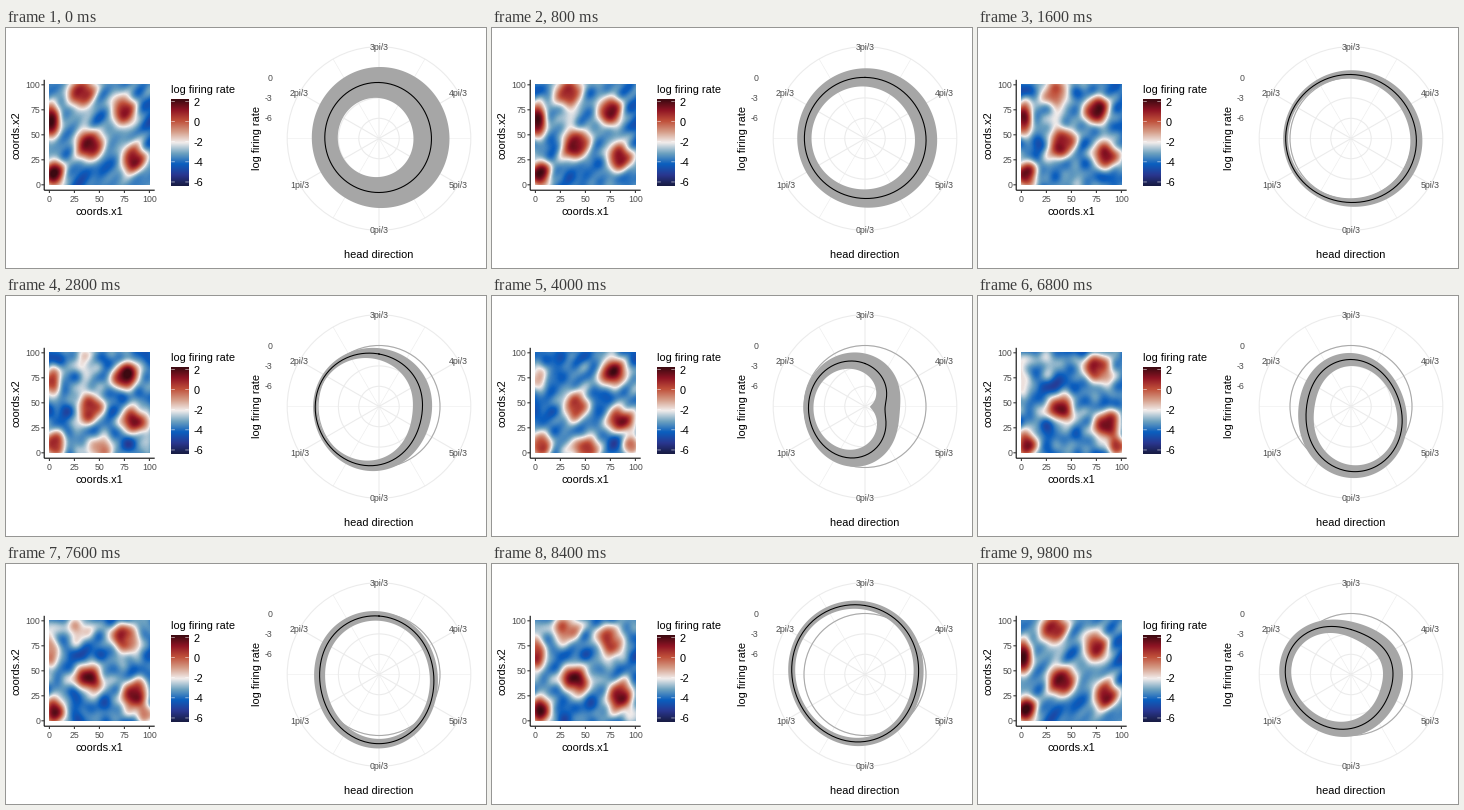
Animation, 480 px wide and 240 px high, one loop 10 s. Source, as a matplotlib script:

```python
import numpy as np
import matplotlib.pyplot as plt
from matplotlib.animation import FuncAnimation
from matplotlib.colors import LinearSegmentedColormap
from matplotlib.patches import Circle, Polygon

W, H, DPI = 480, 240, 72
FRAMES, INTERVAL = 50, 200
LOW, HIGH = -6.4, 2.2
CX, CY = 373, 110.5          # centre of the polar plot
RIM, ZERO, UNIT = 91.8, 61, 6.8
GREY, GRID, RIBBON = "#4d4d4d", "#ebebeb", "#a6a6a6"

plt.rcParams["font.family"] = "Liberation Sans"
BALANCE = LinearSegmentedColormap.from_list("balance", [
    "#181c43", "#2a3790", "#0b5ebe", "#6ea2c0", "#f1eceb",
    "#d59c87", "#c0503a", "#8f1424", "#3c0911"])

# Hot spots: x, y, x radius, y radius, height,
# then the swing of y and of height over the loop and its phase in degrees
SPOTS = [(40, 43, 14, 15, 5.2, -4, 0.2, 0),
         (76, 79, 14, 15, 5.2, -6, 0.3, 20),
         (85, 29, 14, 14, 5.3, -4, 0.2, -30),
         (5, 9, 11, 14, 5.2, 2, 0.3, 0),
         (32, 91, 15, 15, 2.2, 0, 2.8, 10),
         (2, 70, 9, 17, 3.8, -7, 1.9, 20),
         (51, 4, 16, 11, 1, 0, 3.7, 150),
         (96, 6, 9, 10, 2, 0, 3, 205)]

# Ring poses: radii every 60 degrees clockwise from the top,
# and the half width of the band at the right and at the left
POSES = {0: ([56, 53, 53, 54, 54, 55], (18, 13)),
         8: ([64, 64, 66, 64, 65, 65], (6, 2.5)),
         20: ([43, 25, 24, 49, 57, 55], (15, 5)),
         28: ([60, 29, 34, 42, 45, 46], (11, 9)),
         34: ([47, 46, 57, 65, 50, 44], (5, 8)),
         42: ([69, 57, 55, 67, 71, 75], (5, 3.5)),
         49: ([45, 42, 43, 54, 62, 64], (10, 6))}
KEYS = np.array(list(POSES))

gx, gy = np.meshgrid(np.arange(101), np.arange(101))
theta = np.linspace(0, 2 * np.pi, 181)


def ripple(rng, waves=24):
    """Smooth random field of unit variance."""
    z = np.zeros(gx.shape)
    for _ in range(waves):
        kx, ky = rng.normal(0, 0.16, 2)
        z += np.cos(kx * gx + ky * gy + rng.uniform(0, 2 * np.pi))
    return z * np.sqrt(2 / waves)


rng = np.random.default_rng(4)
ripple_cos, ripple_sin = ripple(rng), ripple(rng)


def rate_map(frame):
    """Hot spots that swell and drift once per loop on a rippled ground."""
    p = 2 * np.pi * frame / (FRAMES - 1)
    z = -3.9 + 0.45 * (np.cos(p) * ripple_cos + np.sin(p) * ripple_sin)
    for x, y, rx, ry, height, dy, dh, phase in SPOTS:
        swing = np.cos(p - np.radians(phase))
        d2 = ((gx - x) / rx) ** 2 + ((gy - y - dy * swing) / ry) ** 2
        z += max(height + dh * swing, 0) * np.exp(-d2 ** 1.25)
    return z


def around(values):
    """Smooth closed curve through evenly spaced radii."""
    n = len(theta) - 1
    coef = np.fft.rfft(values)
    coef[-1] /= 2
    r = np.fft.irfft(coef, n) * n / len(values)
    return np.append(r, r[0])


def band(right, left):
    return (right + left) / 2 + (right - left) / 2 * np.sin(theta)


rings = np.array([(around(r), band(*w)) for r, w in POSES.values()])
slopes = np.gradient(rings, KEYS, axis=0)


def ring(frame):
    """Radius and half width, eased between the poses."""
    i = min(np.searchsorted(KEYS, frame, side="right") - 1, len(KEYS) - 2)
    span = KEYS[i + 1] - KEYS[i]
    u = (frame - KEYS[i]) / span
    ease = u * u * (3 - 2 * u)
    return (rings[i] + ease * (rings[i + 1] - rings[i])
            + span * u * (1 - u) ** 2 * slopes[i]
            - span * u * u * (1 - u) * slopes[i + 1])


def polar(r, angle):
    return np.stack([CX + r * np.sin(angle), CY - r * np.cos(angle)], axis=-1)


fig = plt.figure(figsize=(W / DPI, H / DPI), dpi=DPI, facecolor="white")
ax = fig.add_axes([0, 0, 1, 1])


def label(x, y, text, size=8.8, color=GREY, ha="center", rotation=0):
    ax.text(x, y, text, size=size, color=color, ha=ha, va="baseline",
            rotation=rotation, rotation_mode="anchor", zorder=6)


def title(x, y, text, ha="center", rotation=0):
    label(x, y, text, 11, "black", ha, rotation)


def line(xs, ys, color="black", lw=1.07, zorder=2):
    ax.plot(xs, ys, color=color, lw=lw, zorder=zorder,
            solid_capstyle="butt", snap=False)


def circle(r, color, zorder=1):
    ax.add_patch(Circle((CX, CY), r, fill=False, ec=color, lw=1.07,
                        zorder=zorder))


# Rate map panel
heat = ax.imshow(rate_map(0), cmap=BALANCE, vmin=LOW, vmax=HIGH,
                 origin="lower", extent=(43, 143.7, 157.2, 56.5),
                 aspect="auto", interpolation="bilinear")
line([38.2, 38.2], [51.8, 162.2])
line([38.2, 148.7], [162.2, 162.2])
for v in range(0, 101, 25):
    px, py = 43.4 + v, 156.8 - v
    line([px, px], [162.2, 165], "#333333")
    line([35.4, 38.2], [py, py], "#333333")
    label(px, 174.4, str(v))
    label(34, py + 3.1, str(v), ha="right")
title(93, 187, "coords.x1")
title(14, 107, "coords.x2", rotation=90)

# Colour bar
title(165, 65, "log firing rate", ha="left")
ramp = np.linspace(LOW, HIGH, 256)[:, None]
ax.imshow(ramp, cmap=BALANCE, origin="lower", extent=(165.3, 182.8, 158, 71.5),
          aspect="auto")
for v in range(2, -7, -2):
    py = 158 - (v - LOW) / (HIGH - LOW) * 86.5
    line([165.3, 168.8], [py, py], "white", 0.5)
    line([179.3, 182.8], [py, py], "white", 0.5)
    title(188, py + 4.2, str(v), ha="left")

# Polar panel
for k in range(12):
    x, y = polar(RIM, k * np.pi / 6)
    line([CX, x], [CY, y], GRID, 0.55 if k % 2 else 1.07, 1)
for r in (RIM, ZERO, ZERO - 3 * UNIT, ZERO - 6 * UNIT):
    circle(r, GRID)
circle(ZERO, "#a9a9a9", 2)
for k in range(6):
    x, y = polar(RIM, np.pi + k * np.pi / 3)
    label(x, y + 3.1, f"{k}pi/3")
for v in (0, -3, -6):
    label(266, CY - ZERO - v * UNIT + 3.1, str(v), ha="right")
title(CX, 230, "head direction")
title(254, CY, "log firing rate", rotation=90)

ribbon = ax.add_patch(Polygon(np.zeros((3, 2)), fc=RIBBON, ec="none",
                              zorder=3))
curve, = ax.plot([], [], color="black", lw=1.07, zorder=4)
ax.set_xlim(0, W)
ax.set_ylim(H, 0)
ax.axis("off")


def draw(frame):
    heat.set_data(rate_map(frame))
    r, half = ring(frame)
    half = np.maximum(half, 2)
    outer = polar(r + half, theta)
    inner = polar(np.maximum(r - half, 0), theta)
    ribbon.set_xy(np.vstack([outer, inner[::-1]]))
    curve.set_data(*polar(r, theta).T)
    return heat, ribbon, curve


anim = FuncAnimation(fig, draw, frames=FRAMES, interval=INTERVAL,
                     repeat=True, repeat_delay=0, blit=False)
plt.show()
```
